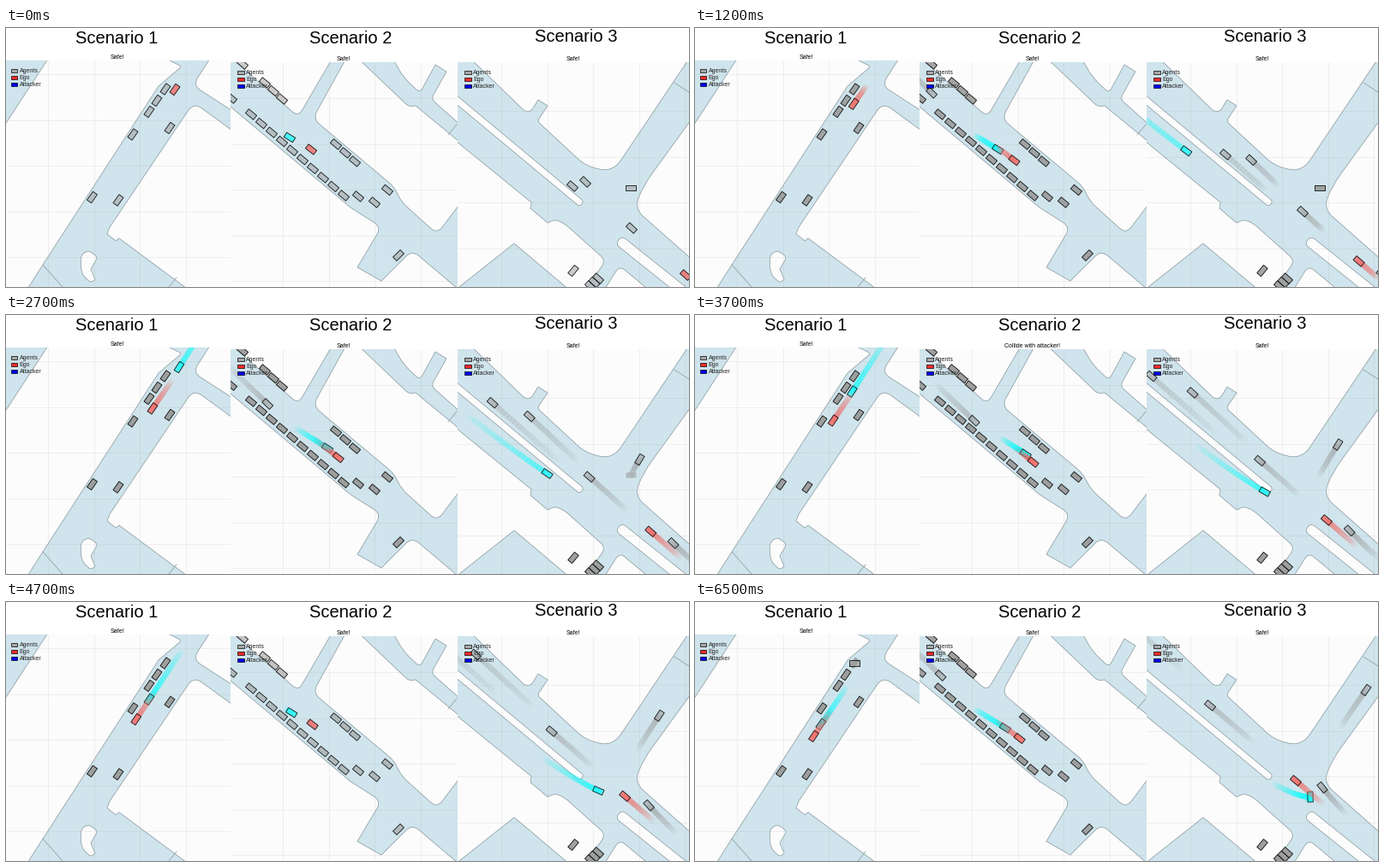
A matplotlib script that plays this animation: 797x303 px, repeating every 6.6 s.

```python
import numpy as np
import matplotlib.pyplot as plt
from matplotlib.animation import FuncAnimation
from matplotlib.collections import PolyCollection
from matplotlib.patches import PathPatch, Rectangle
from matplotlib.path import Path

W, H, DPI = 797, 303, 100
FRAMES, INTERVAL = 66, 100
LAST, RESTART, CRASH, LATE = 60, 44, 30, 58
TRAIL = 20
CAR = np.array([(-6, -3.1), (6, -3.1), (6, 3.1), (-6, 3.1)])
ROAD, LAND, LINE = "#cfe4ec", "#fcfcfc", "#93a1a7"

# colour, opacity of the car, opacity of one trail box
GRAY = ((0.61, 0.61, 0.61), 0.5, 0.17)
EGO = ((0.95, 0.42, 0.40), 0.8, 0.2)
ATTACKER = ((0.0, 1.0, 1.0), 0.65, 0.3)

plt.rcParams["font.family"] = "Liberation Sans"
fig = plt.figure(figsize=(W / DPI, H / DPI), dpi=DPI, facecolor="white")


def px(n):
    return n * 72 / DPI


def label(x, y, text, size):
    return fig.text(x / W, 1 - y / H, text, fontsize=px(size), color="black",
                    ha="center", va="baseline")


def rounded(pts):
    """Closed path; a third value in a point is its corner radius."""
    verts, codes = [], []
    for i, (x, y, *r) in enumerate(pts):
        p = np.array((x, y), float)
        if not r:
            verts.append(p)
            codes.append(Path.LINETO)
            continue
        ends = []
        for q in (pts[i - 1], pts[(i + 1) % len(pts)]):
            d = np.array(q[:2]) - p
            ends.append(p + d * min(0.5, r[0] / np.hypot(*d)))
        verts += [ends[0], p, ends[1]]
        codes += [Path.LINETO, Path.CURVE3, Path.CURVE3]
    codes[0] = Path.MOVETO
    return Path(verts + [verts[0]], codes + [Path.CLOSEPOLY])


def band(a, b, width):
    """Straight strip from a to b with round corners."""
    a, b = np.array(a, float), np.array(b, float)
    d = (b - a) / np.hypot(*(b - a)) * width / 2
    n = np.array((-d[1], d[0]))
    return [(*p, width / 2) for p in (a + n, b + n, b - n, a - n)]


class Car:
    """Follows a parabola through a, mid and b, heading along it."""

    def __init__(self, kind, a, mid, b, start=0, end=LAST, rest=None, turn=0):
        self.kind, self.keys = kind, np.array((a, mid, b), float)
        self.start, self.end, self.rest, self.turn = start, end, rest, turn

    def pose(self, t):
        u = np.clip((t - self.start) / (self.end - self.start), 0, 1)
        pos = np.array(((1 - u) * (1 - 2 * u), 4 * u * (1 - u), u * (2 * u - 1))) @ self.keys
        vx, vy = np.array((4 * u - 3, 4 - 8 * u, 4 * u - 1)) @ self.keys
        waiting = self.rest is not None and t <= self.start
        angle = np.radians(self.rest) if waiting else np.arctan2(vy, vx)
        return pos, angle + np.radians(self.turn if t >= LATE else 0)

    def box(self, t):
        pos, a = self.pose(t)
        c, s = np.cos(a), np.sin(a)
        return CAR @ np.array([(c, s), (-s, c)]) + pos


def parked(angle, p, q=None, n=1, turn=0):
    """A row of n standing cars between p and q."""
    spots = np.linspace(p, p if q is None else q, n)
    return [Car(GRAY, s, s, s, start=LAST, end=LAST + 1, rest=angle, turn=turn)
            for s in spots]


class Panel:
    def __init__(self, x0, x1, y0, inset, roads, islands, marks, grid, cars):
        self.cars = cars
        ax = fig.add_axes([x0 / W, 0, (x1 - x0) / W, (H - y0) / H], facecolor=LAND)
        ax.set(xlim=(x0, x1), ylim=(H, y0), xticks=[], yticks=[])
        ax.spines[:].set_visible(False)
        for shapes, fill in ((roads, ROAD), (islands, LAND)):
            for pts in shapes:
                ax.add_patch(PathPatch(rounded(pts), fc=fill, ec=LINE, lw=px(0.8)))
        for a, b in marks:
            ax.plot(*zip(a, b), color=LINE, lw=px(0.8))
        for x in np.arange(grid[0], x1, 53.5):
            ax.axvline(x, color="#b0b0b0", alpha=0.22, lw=px(0.8), zorder=3)
        for y in np.arange(grid[1], H, 53.5):
            ax.axhline(y, color="#b0b0b0", alpha=0.22, lw=px(0.8), zorder=3)
        self.boxes = PolyCollection([], zorder=4)
        ax.add_collection(self.boxes, autolim=False)

        entries = (("Agents", "#a8a8a8"), ("Ego", "#fb2c2c"), ("Attacker", "#0000ff"))
        for i, (name, color) in enumerate(entries):
            x, y = x0 + inset, y0 + 12 + 8 * i
            ax.add_patch(Rectangle((x, y - 1.8), 7.5, 3.6, fc=color, ec="black",
                                   lw=px(0.7), zorder=5))
            ax.text(x + 10, y - 0.4, name, fontsize=px(7), color="#222222",
                    va="center_baseline", zorder=5)

    def draw(self, step):
        polys, faces, edges = [], [], []
        for car in self.cars:
            rgb, head, tail = car.kind
            for t in range(max(0, step - TRAIL), step + 1):
                now, fade = t == step, 1 - 0.8 * (step - t) / TRAIL
                polys.append(car.box(t))
                faces.append((*rgb, head if now else tail * fade))
                edges.append((0, 0, 0, 0.85 if now else 0))
        self.boxes.set_verts(polys)
        self.boxes.set(facecolors=faces, edgecolors=edges, linewidths=px(0.9))


for i, (x, y) in enumerate([(129, 18), (402.5, 18), (665.5, 16)]):
    label(x, y, f"Scenario {i + 1}", 20.1)
status = [label(x, y, "Safe!", 7) for x, y in [(129.5, 36.5), (394, 38.5), (662, 38.5)]]

panel1 = Panel(
    0, 262, 38, inset=5.5,
    roads=[
        [(-5, 30), (53, 30), (-5, 119)],
        [(20, 313), (43, 277), (178, 68), (205, 45, 3), (185, 35), (185, 25),
         (245, 25), (218, 67, 10), (275, 104), (275, 128), (219, 87, 12),
         (121, 233), (118, 241), (128, 249), (132, 246), (222, 313)],
    ],
    islands=[[(96, 260, 5), (87, 266, 6), (88, 288, 8), (99, 298, 3),
              (104, 294), (99, 282), (107, 268, 4)]],
    marks=[((43, 277), (66, 303)), ((199, 292), (190, 303))],
    grid=(49, 54),
    cars=parked(-55, (176, 85), (167, 98), 2) + parked(-55, (148, 124.5))
    + parked(-55, (191, 117)) + parked(-55, (100.5, 198)) + parked(-55, (131, 201.5))
    + parked(-55, (186, 71.5), turn=55) + [
        Car(ATTACKER, (259, -28), (192.4, 75.8), (147, 143)),
        Car(EGO, (197, 72), (166, 116.5), (138.5, 157)),
    ])

panel2 = Panel(
    262, 527, 40, inset=8,
    roads=[
        [(250, 26), (262, 34), (341, 104, 9), (384, 30), (400, 30), (358, 106, 10),
         (452, 185, 6), (462, 204, 8), (503, 241, 10), (540, 192), (540, 316),
         (474, 260, 10), (438, 296), (410, 280), (438, 233, 10), (402, 210),
         (250, 82)],
        [(405, 30), (470, 92, 4), (478, 91), (540, 142), (540, 122), (496, 83, 6),
         (514, 51), (501, 43), (483, 76, 6), (464, 58, 10), (448, 30)],
    ],
    islands=[],
    marks=[((516, 125), (526, 113))],
    grid=(323, 82),
    cars=parked(40, (286, 101), (394, 196), 10) + parked(40, (411, 197), (430, 204), 2)
    + parked(40, (385, 136), (407, 156), 3) + parked(40, (302, 64), (322, 83), 3)
    + parked(40, (445, 189.5)) + parked(40, (276, 42)) + parked(40, (263, 82))
    + parked(-45, (458, 266)) + [
        Car(GRAY, (253, 53), (299, 98), (344, 141), end=RESTART),
        Car(ATTACKER, (331, 128), (371, 153), (392, 167), end=RESTART),
        Car(EGO, (356, 142), (385, 164.5), (398, 175), end=RESTART),
    ])

panel3 = Panel(
    527, 797, 40, inset=8,
    roads=[
        [(515, 30), (536, 30), (606, 98, 4), (613, 97, 3), (621, 84), (632, 91),
         (620, 109, 4), (676, 161, 12), (708, 169, 18), (803, 27), (812, 27),
         (812, 90), (744, 184, 16), (733, 211, 14), (812, 281), (812, 315),
         (670, 315), (700, 272, 8), (652, 229, 5), (641, 224, 4), (632, 228),
         (612, 211), (613, 204), (515, 124)],
        [(520, 310), (593, 252), (664, 312)],
    ],
    islands=[
        band((515, 75), (672, 206), 8),
        band((715, 248), (806, 321), 12),
        [(694, 313), (716, 278, 8), (758, 313)],
    ],
    marks=[((780, 64), (797, 75))],
    grid=(578, 97),
    cars=parked(-50, (662, 284)) + parked(42, (691, 293), (682, 302), 3) + [
        Car(GRAY, (676, 180), (596, 105), (495, 14)),
        Car(GRAY, (661, 185), (550, 87), (450, -2)),
        Car(GRAY, (730, 234), (670, 180), (601, 121)),
        Car(GRAY, (821, 305), (771, 259.5), (732, 217)),
        Car(GRAY, (729, 187), (752.5, 148), (783, 103), start=14, rest=0),
        Car(ATTACKER, (518, 101), (649, 197), (718, 228), turn=-90),
        Car(EGO, (793, 289), (744.5, 246.5), (701, 209)),
    ])


def update(n):
    # two repeated pictures, then a hold at the end
    step = min(n - (n >= 6) - (n >= 26), LAST)
    panel1.draw(step)
    panel2.draw(step % RESTART)
    panel3.draw(step)
    crashed = CRASH <= step < RESTART
    status[1].set_text("Collide with attacker!" if crashed else "Safe!")
    return []


anim = FuncAnimation(fig, update, frames=FRAMES, interval=INTERVAL,
                     init_func=lambda: update(0), repeat=True, repeat_delay=0)
plt.show()
```
